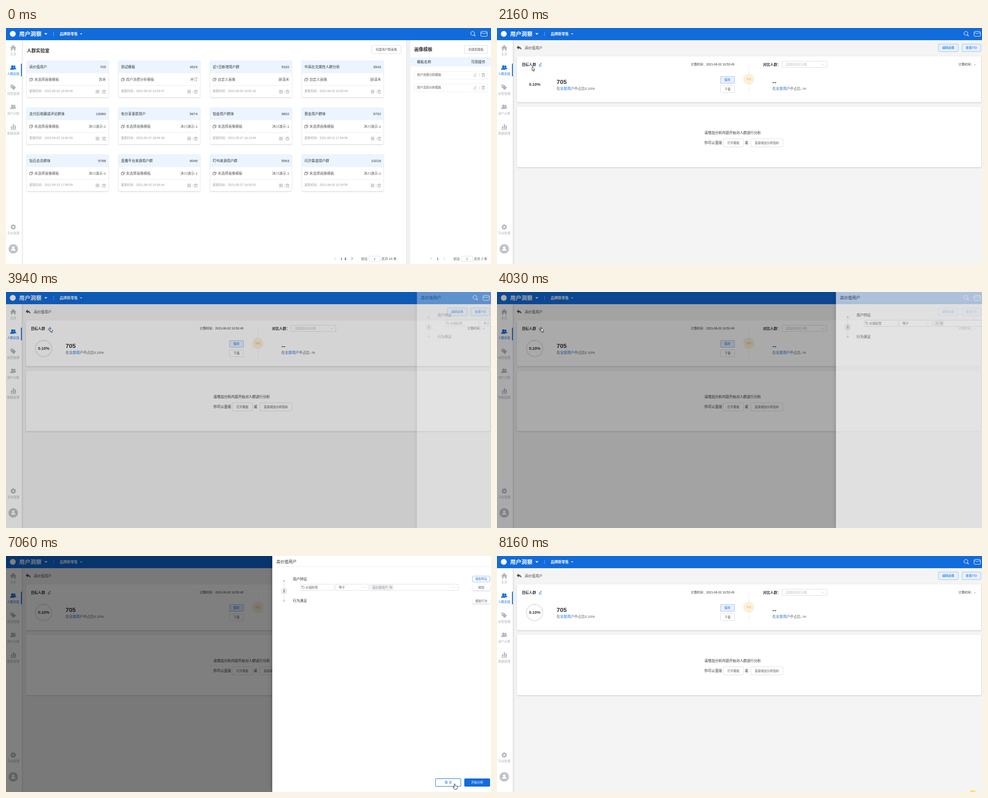
An HTML page with a canvas that plays this animation: 1071 by 523 pixels, repeating every 8270 ms.

```html
<!DOCTYPE html>
<html lang="zh-CN">
<head>
<meta charset="utf-8">
<style>
html, body { margin: 0; width: 100%; height: 100%; overflow: hidden; background: #fff; }
canvas { display: block; }
</style>
</head>
<body>
<canvas id="stage" width="1071" height="523"></canvas>
<script>
const W = 1071, H = 523, LOOP = 8270, TAU = Math.PI * 2;
const FONT = '"Liberation Sans", "Noto Sans CJK SC", "Noto Sans CJK", sans-serif';
const BLUE = '#126bdb', INK = '#303133', TEXT = '#55585d', MUTED = '#999', ICON = '#b4b6ba', LINE = '#dcdfe6', PALE = '#ebf4ff';
const BASE = 7.81, SMALL = 6.7;
const stage = document.getElementById('stage').getContext('2d');
let c = stage;

const clamp = v => Math.min(1, Math.max(0, v));
const span = (t, a, b) => clamp((t - a) / (b - a));
const out = u => 1 - (1 - u) ** 2;
const outCubic = u => 1 - (1 - u) ** 3;
const inOut = u => u < .5 ? 4 * u ** 3 : 1 - (2 - 2 * u) ** 3 / 2;
const smooth = u => u * u * (3 - 2 * u);
const linear = u => u;

function layer(draw) {
  const canvas = document.createElement('canvas');
  canvas.width = W;
  canvas.height = H;
  const previous = c;
  c = canvas.getContext('2d');
  draw();
  c = previous;
  return canvas;
}

function text(s, x, y, size = BASE, color = TEXT, align = 'left', weight = 400) {
  c.font = `${weight} ${size}px ${FONT}`;
  c.textAlign = align;
  c.fillStyle = color;
  c.fillText(s, x, y + size * .37);
  return c.measureText(s).width;
}

function rect(x, y, w, h, color) {
  c.fillStyle = color;
  c.fillRect(x, y, w, h);
}

function box(x, y, w, h, fill, border, r = 1.5) {
  c.beginPath();
  c.roundRect(x + .5, y + .5, w - 1, h - 1, r);
  if (fill) { c.fillStyle = fill; c.fill(); }
  if (border) { c.strokeStyle = border; c.lineWidth = 1; c.stroke(); }
}

function shadowed(blur, dy, alpha, draw) {
  c.save();
  c.shadowColor = `rgba(0,0,0,${alpha})`;
  c.shadowBlur = blur;
  c.shadowOffsetY = dy;
  draw();
  c.restore();
}

function button(s, x, y, w, h, fill = '#fff', border = LINE, color = TEXT) {
  box(x, y, w, h, fill, border);
  text(s, x + w / 2, y + h / 2, SMALL, color, 'center');
}

function path(points, { fill, stroke, width = 1, close = false }) {
  c.beginPath();
  points.forEach(([x, y], i) => i ? c.lineTo(x, y) : c.moveTo(x, y));
  if (close) c.closePath();
  if (fill) { c.fillStyle = fill; c.fill(); }
  if (stroke) { c.strokeStyle = stroke; c.lineWidth = width; c.stroke(); }
}

function disc(x, y, r, color) {
  c.beginPath();
  c.arc(x, y, r, 0, TAU);
  c.fillStyle = color;
  c.fill();
}

function ring(x, y, r, width, color, turn = 1) {
  c.beginPath();
  c.arc(x, y, r, -TAU / 4, TAU * (turn - .25));
  c.strokeStyle = color;
  c.lineWidth = width;
  c.stroke();
}

const triangle = (x, y, r, color) =>
  path([[x - r, y - r / 2], [x + r, y - r / 2], [x, y + r / 2]], { fill: color });
const chevron = (x, y, color = '#c0c4cc') =>
  path([[x - 2.5, y - 1.2], [x, y + 1.3], [x + 2.5, y - 1.2]], { stroke: color, width: .8 });
const arrowhead = (x, y, dir, color) =>
  path([[x - dir * 1.3, y - 2.6], [x + dir * 1.3, y], [x - dir * 1.3, y + 2.6]], { stroke: color, width: .9 });

function pencil(x, y, color) {
  path([[x - 2.5, y + 2], [x - 2, y + .3], [x + 1.7, y - 3.2], [x + 3, y - 2], [x - .8, y + 1.6]],
    { stroke: color, width: .9, close: true });
  path([[x - 3, y + 3.5], [x + 3.5, y + 3.5]], { stroke: color, width: .8 });
}

function trash(x, y) {
  path([[x - 3.7, y - 2.5], [x + 3.7, y - 2.5]], { stroke: ICON });
  path([[x - 1.3, y - 3.6], [x + 1.3, y - 3.6]], { stroke: ICON });
  c.strokeRect(x - 2.8, y - 2, 5.6, 5.5);
  path([[x - .9, y - .5], [x - .9, y + 2.3]], { stroke: ICON, width: .7 });
  path([[x + .9, y - .5], [x + .9, y + 2.3]], { stroke: ICON, width: .7 });
}

function gridIcon(x, y) {
  c.strokeStyle = ICON;
  c.lineWidth = .9;
  for (const dx of [-3.3, .7]) for (const dy of [-3.3, .7]) c.strokeRect(x + dx, y + dy, 2.6, 2.6);
}

function copyIcon(x, y) {
  c.strokeStyle = '#606266';
  c.lineWidth = .8;
  c.strokeRect(x - 3.5, y - 1.2, 5, 4.5);
  path([[x - 1.7, y - 1.2], [x - 1.7, y - 3], [x + 3.6, y - 3], [x + 3.6, y + 1.5], [x + 1.5, y + 1.5]],
    { stroke: '#606266', width: .8 });
}

function tagIcon(x, y, s, color, hollow) {
  const points = [[-6, -5.5], [-1, -5.5], [6, 1], [1, 6.5], [-6, 0]].map(([a, b]) => [x + a * s, y + b * s]);
  path(points, hollow ? { stroke: color, width: .8, close: true } : { fill: color });
  disc(x - 3 * s, y - 2.6 * s, 1.2 * s, hollow ? color : '#fff');
}

function person(x, y, s, color) {
  disc(x, y - 2.5 * s, 2.7 * s, color);
  c.beginPath();
  c.ellipse(x, y + 4.5 * s, 5 * s, 4.5 * s, 0, Math.PI, TAU);
  c.fill();
}

function people(y, color) {
  person(18.5, y - .5, .85, color);
  person(14, y, 1.12, '#fff');
  person(14, y, 1, color);
}

function gear(x, y) {
  c.beginPath();
  for (let i = 0; i < 8; i++) {
    const a = i * TAU / 8;
    for (const [r, d] of [[4.6, -.3], [6.2, -.18], [6.2, .18], [4.6, .3]])
      c.lineTo(x + r * Math.cos(a + d), y + r * Math.sin(a + d));
  }
  c.fillStyle = ICON;
  c.fill();
  disc(x, y, 2.1, '#fff');
}

function chrome(shift) {
  shadowed(4, 0, .25, () => rect(0, 27, 35, H, '#fff'));
  rect(0, 0, W, 27, BLUE);
  disc(15, 13, 6.5, '#fff');
  text('用户洞察', 29, 13, 12.4, '#fff', 'left', 900);
  triangle(88, 13.2, 3.6, '#fff');
  rect(104.5, 8, 1, 10, 'rgba(255,255,255,.45)');
  text('品牌新零售', 118.5, 13, 8, '#fff', 'left', 700);
  triangle(166, 13.2, 2.4, '#fff');
  const sx = 1030.5 + shift;
  ring(sx, 12, 4.2, 1.1, '#fff');
  path([[sx + 3, 15], [sx + 6, 18]], { stroke: '#fff', width: 1.4 });
  box(1048 + shift, 7, 15, 12, null, '#fff', 2);
  path([[1049 + shift, 11], [1053 + shift, 11], [1055.5 + shift, 13], [1058 + shift, 11], [1062 + shift, 11]], { stroke: '#fff' });

  path([[9, 44.5], [16, 37.5], [23, 44.5], [21, 44.5], [21, 50], [17.8, 50], [17.8, 46], [14.2, 46], [14.2, 50], [11, 50], [11, 44.5]], { fill: ICON });
  people(88, BLUE);
  rect(33, 79, 2, 28, BLUE);
  tagIcon(16, 131, 1, ICON);
  people(175, ICON);
  for (const [x, h] of [[11, 6], [15, 11], [19, 8]]) rect(x, 224 - h, 2.6, h, ICON);
  rect(9.5, 225, 13, 1, ICON);
  gear(16, 441);
  [['主页', 57.5], ['人群实验', 101.5], ['标签管理', 145.5], ['用户分群', 189.5], ['数据管理', 233.5], ['平台管理', 454.5]]
    .forEach(([s, y], i) => text(s, 16, y, SMALL, i === 1 ? BLUE : '#b0b0b0', 'center'));
  disc(16, 489.5, 10.5, '#bfc3c9');
  person(16, 489, 1, '#fff');
}

function card(x, y, [title, count, template, owner, time]) {
  shadowed(3, 1, .2, () => box(x, y, 181, 82, '#fff', null, 2));
  rect(x, y, 181, 28, PALE);
  text(title, x + 6, y + 14.3, BASE, INK);
  text(count, x + 175, y + 14.3, BASE, INK, 'right');
  copyIcon(x + 10, y + 42);
  text(template, x + 17, y + 42, BASE, TEXT);
  text(owner, x + 175, y + 42, BASE, TEXT, 'right');
  rect(x + 6, y + 55, 169, 1, '#ececec');
  text('更新时间：', x + 6, y + 68, SMALL, MUTED);
  text('2021-' + time, x + 39.5, y + 68, SMALL, MUTED);
  gridIcon(x + 156.5, y + 69);
  rect(x + 164, y + 66, 1, 7, '#ddd');
  trash(x + 171, y + 69);
}

function pager(x, pages, total) {
  arrowhead(x, 511, -1, '#b0b3b8');
  pages.forEach((p, i) => text(p, x + 14.3 + i * 8.7, 511.3, 7.25, i ? INK : BLUE, 'center', 700));
  const end = x + 29 + (pages.length - 1) * 8.5;
  arrowhead(end, 511, 1, pages.length > 1 ? INK : '#b0b3b8');
  text('前往', end + 20, 511.3, 7.25);
  box(end + 37, 505, 26, 13, '#fff', LINE);
  text('1', end + 50, 511.5, 7.25, TEXT, 'center');
  text(total, end + 65, 511.3, 7.25);
}

const NONE = '未选择画像模板', CUSTOM = '自定义画像', DEMO = '沐川演示-1', LEAD = '顾清禾';
const CARDS = [
  ['高价值用户', '705', NONE, '苏禾', '06-02 10:53:49'],
  ['测试模板', '4524', '用户消费分析模板', '叶汀', '06-02 10:53:47'],
  ['近7日新增用户群', '5320', CUSTOM, LEAD, '06-02 10:52:32'],
  ['中高社交属性人群分析', '3543', CUSTOM, LEAD, '06-02 10:52:44'],
  ['支付后收藏或评论群体', '18380', NONE, DEMO, '06-02 10:30:39'],
  ['有分享意愿用户', '5674', NONE, DEMO, '05-27 18:09:28'],
  ['铂金用户群体', '9802', NONE, DEMO, '05-27 18:12:04'],
  ['黄金用户群体', '9752', NONE, DEMO, '05-31 17:59:59'],
  ['钻石会员群体', '9788', NONE, DEMO, '05-31 17:59:59'],
  ['直播平台来源用户群', '6046', NONE, DEMO, '06-02 10:26:44'],
  ['叮屿来源用户群', '5063', NONE, DEMO, '05-27 18:09:51'],
  ['闪汐渠道用户群', '10218', NONE, DEMO, '06-02 10:29:55']
];

const labPage = layer(() => {
  rect(0, 0, W, H, '#fff');
  rect(884, 27, 9, H, '#f1f1f1');
  rect(883.5, 27, 1, H, '#e6e6e6');
  text('人群实验室', 46, 50.5, 10.04, INK, 'left', 700);
  button('创建用户群画像', 807, 38, 66, 19);
  CARDS.forEach((data, i) => card(45.5 + i % 4 * 202.5, 72 + Math.floor(i / 4) * 104, data));
  pager(726.5, ['1', '2'], '页共 16 条');

  text('画像模板', 901.5, 47.5, 10.04, INK, 'left', 700);
  button('创建新模板', 1012, 38, 52, 19);
  rect(893, 65, 178, 20, PALE);
  text('模板名称', 907.5, 75.5, BASE, INK);
  text('可用操作', 1027, 75.5, BASE, INK);
  ['用户消费分析模板', '用户活跃分析模板'].forEach((s, i) => {
    const y = 104 + i * 28;
    box(902, y - 9, 162, 19, '#fff', '#f1f1f1');
    text(s, 907.5, y, SMALL);
    pencil(1035.5, y, ICON);
    rect(1045, y - 4, 1, 9, '#ddd');
    trash(1054, y);
  });
  pager(939, ['1'], '页共 2 条');
  chrome(0);
});

function share(x, value) {
  x += text('在', x, 134);
  x += text('全部用户', x, 134, BASE, BLUE);
  text('中占比' + value, x, 134);
}

const detailPage = layer(() => {
  rect(0, 0, W, H, '#f4f4f4');
  path([[43.5, 43], [48, 39], [48, 41.5]], { fill: '#555' });
  c.beginPath();
  c.moveTo(43.5, 43.3);
  c.lineTo(48, 39);
  c.lineTo(48, 41.5);
  c.quadraticCurveTo(54, 41.8, 54, 48.5);
  c.quadraticCurveTo(52, 45, 48, 45);
  c.lineTo(48, 47.5);
  c.fillStyle = '#555';
  c.fill();
  text('高价值用户', 61.5, 44, BASE, '#444');
  button('编辑画像', 974, 35, 45, 18, '#e7f0fb', '#a0c4f1', BLUE);
  button('查看TGI', 1026, 35, 43, 18, '#e7f0fb', '#a0c4f1', BLUE);
  for (const [y, h] of [[62, 103], [174, 135]])
    shadowed(3, 1, .2, () => box(43.5, y, 1026, h, '#fff', null, 1));

  text('目标人群', 55, 81, BASE, INK, 'left', 700);
  pencil(95.5, 81, BLUE);
  text('计算时间：', 428, 81, SMALL, INK);
  text('2021-06-02 10:53:49', 462, 81, SMALL, INK);
  text('705', 131.5, 119, 13.4, INK, 'left', 700);
  share(131.5, '0.10%');
  button('保存', 493, 107, 32, 16, '#e7f0fb', '#a0c4f1', BLUE);
  button('下载', 493, 128, 32, 16);
  rect(556, 83, 1, 61, '#eee');
  disc(556, 113.5, 12.3, '#fbf1d9');
  text('VS', 556, 113.5, BASE, '#d9a648', 'center');
  text('对比人群：', 587.5, 81, BASE, INK, 'left', 700);
  box(629, 73, 100, 15, '#fff', LINE);
  text('请选择对比分群', 638, 81, SMALL, '#b9bdc5');
  chevron(719, 81);
  text('计算时间：', 1019, 80.5, SMALL, INK);
  text('--', 1053, 80.5, SMALL, INK);
  text('--', 608, 120, 13.4, INK, 'left', 700);
  share(608, '--%');

  text('请增加分析内容开始对人群进行分析', 458, 232.5, BASE, INK);
  text('你可以直接', 458, 254.5, BASE, INK);
  button('打开模板', 499, 245, 46, 19);
  text('或', 547, 254.5, BASE, INK);
  button('直接增加分析指标', 560, 245, 72, 19);
  chrome(5);
});

const drawer = (loaded, focused, hovered) => layer(() => {
  shadowed(9, 0, .35, () => rect(588, 0, 490, H, '#fff'));
  text('高价值用户', 597, 12.5, 8.93, INK, 'left', 500);
  rect(597, 23, 473, 1, '#eee');
  rect(613.5, 56, 1, 43, '#e4e4e4');
  disc(614, 55.5, 2.2, '#d0d0d0');
  disc(614, 99.3, 2.2, '#d0d0d0');
  box(608, 72, 12, 12, '#fff', '#ccc');
  text('且', 614, 78, SMALL, INK, 'center');
  text('用户特征', 633.5, 51, BASE, INK);
  text('行为满足', 633.5, 99, BASE, INK);

  box(650, 62, 75, 15, '#fff', LINE);
  tagIcon(656.5, 69.3, .5, '#606266', true);
  text('价值标签', 662, 69.5, SMALL);
  box(727, 62, 74, 15, '#fff', LINE);
  text('等于', 735, 69.5, SMALL);
  chevron(790.5, 69.5);
  box(803, 62, 196, 15, '#fff', LINE);
  const tagWidth = loaded ? 49 : 20;
  box(806, 64, tagWidth, 11, '#f0f0f2', '#e6e6e8');
  text(loaded ? '高价值用户' : '5', 809.5, 69.3, SMALL, '#909399');
  disc(801 + tagWidth, 69.2, 2.8, '#b8bbc0');
  text('×', 801 + tagWidth, 69.1, 5, '#fff', 'center');
  chevron(989, 69.5);

  button('增加特征', 1030, 44, 39, 14, '#fff', focused ? BLUE : '#9cc0ee', BLUE);
  shadowed(2, 1, .22, () => {
    box(1030, 63, 39, 14, '#fff');
    box(1030, 93, 39, 13, '#fff');
  });
  text('增加', 1049.5, 70, SMALL, TEXT, 'center');
  text('增加行为', 1049.5, 99.5, SMALL, TEXT, 'center');
  button('取 消', 948, 493, 57, 18, '#fff', hovered ? BLUE : LINE, hovered ? BLUE : TEXT);
  button('开始分析', 1012, 493, 57, 18, BLUE, BLUE, '#fff');
});

const drawerLoading = drawer(false, true, false);
const drawerReady = drawer(true, true, false);
const drawerHover = drawer(true, true, true);
const drawerBlurred = drawer(true, false, true);

// time, x, y, easing on the way to this point
const TRACK = [
  [210, 1030, 521], [350, 912, 478, out], [590, 912, 478], [1390, 77, 90, inOut],
  [1420, 77, 90], [1520, 74, 85, smooth], [2100, 74, 85], [2600, 146, 84, smooth],
  [2900, 146, 84], [3420, 97, 79, smooth], [4560, 97, 79], [4920, 877, 56, linear],
  [5100, 952, 46, out], [5360, 1002, 62, out], [5390, 1002, 62], [5760, 893, 190, smooth],
  [6200, 960, 343, smooth], [6230, 960, 343], [7020, 991, 505, outCubic], [7570, 991, 505],
  [7890, 1034, 526, smooth]
];
const HAND = [[1420, 2050], [3330, 3880], [6500, 7220]];
const CLICKS = [[1490, 1790, 74, 85.5], [3540, 3870, 97, 79.3], [8110, LOOP, 1050.5, 526]];

function cursorAt(t) {
  const i = TRACK.findIndex(k => k[0] > t);
  if (i < 1) return null;
  const [t0, x0, y0] = TRACK[i - 1], [t1, x1, y1, ease = linear] = TRACK[i];
  const u = ease(span(t, t0, t1));
  return [x0 + (x1 - x0) * u, y0 + (y1 - y0) * u];
}

function drawCursor(t) {
  const at = cursorAt(t);
  if (!at) return;
  c.save();
  c.translate(...at);
  c.lineJoin = 'round';
  const style = { fill: '#fff', stroke: '#222', width: .9, close: true };
  if (HAND.some(([a, b]) => t >= a && t < b))
    path([[-1.3, .2], [-.4, -.5], [.6, .2], [.6, 4], [2.2, 3.9], [3.6, 4.4], [5.2, 5], [5.8, 6.5],
      [5.3, 9], [4.3, 12], [-.6, 12], [-3.8, 7.5], [-3.3, 6.5], [-1.3, 8]], style);
  else
    path([[.5, .3], [.5, 9.6], [2.5, 7.8], [4, 11], [5.4, 10.3], [4, 7.2], [6.6, 7]], style);
  c.restore();
}

function drawDrawer(t) {
  const p = out(span(t, 3870, 4250)) * (1 - out(span(t, 7080, 7310)));
  if (!p) return;
  rect(0, 0, W, H, `rgba(0,0,0,${.5 * p})`);
  const panel = t < 4200 ? drawerLoading : t < 6500 ? drawerReady : t < 6990 ? drawerHover : drawerBlurred;
  c.globalAlpha = p;
  c.drawImage(panel, 483 * (1 - p), 0);
  c.globalAlpha = 1;
}

function render(t) {
  c.drawImage(labPage, 0, 0);
  if (t >= 1790) {
    c.globalAlpha = smooth(span(t, 1780, 2090));
    c.drawImage(detailPage, 0, 0);
    ring(83, 125.3, 18, 3, '#ebebeb', inOut(span(t, 2510, 3450)));
    if (t > 3430) rect(82.5, 106, 1, 3, '#c4c9d0');
    text('0.10%', 83.3, 125, 8.9, INK, 'center', 700);
    c.globalAlpha = 1;
  }
  drawDrawer(t);
  for (const [from, to, x, y] of CLICKS)
    if (t >= from && t < to) disc(x, y, 7.3 * (.5 + .5 * span(t, from, from + 45)), 'rgba(250,228,36,.78)');
  drawCursor(t);
}

const start = performance.now();
function frame() {
  render((performance.now() - start) % LOOP);
  requestAnimationFrame(frame);
}
frame();
</script>
</body>
</html>
```
